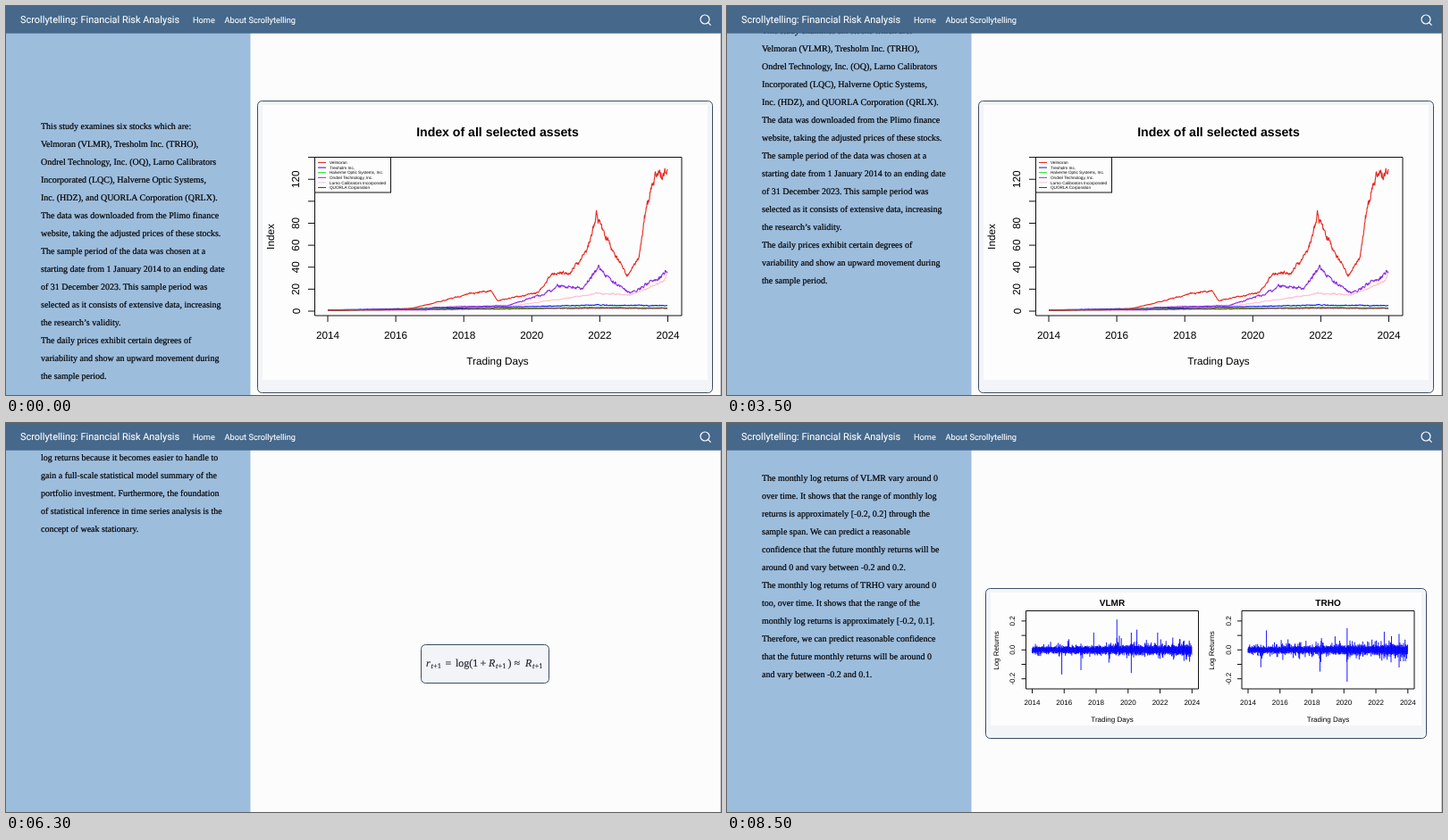
An HTML page that plays this animation: 800x436 px, repeating every 8.6 s.

```html
<!DOCTYPE html>
<html lang="en">
<head>
<meta charset="utf-8">
<title>Scrollytelling: Financial Risk Analysis</title>
<style>
  html, body { margin: 0; width: 100%; height: 100%; overflow: hidden; background: #fcfcfd; }
  svg { display: block; width: 800px; height: 436px; text-rendering: geometricPrecision; }
  .prose { font: 10px "Liberation Serif", Times, serif; stroke: #000; stroke-width: .2; }
  .nav { font: 9.25px Roboto, sans-serif; fill: #fff; stroke: #fff; stroke-width: .1; }
  .brand { font-size: 10.95px; }
  .plot { font: 11.75px "Liberation Sans", Arial, sans-serif; }
  .small { font-size: 8px; }
  .title { font-weight: bold; font-size: 14.1px; }
  .small .title { font-size: 10px; }
  .legend { font-size: 4.67px; }
  .math { font: 12px "Liberation Serif", Times, serif; fill: #1c2430; stroke: #1c2430; stroke-width: .15; }
  .math .sub { font-size: 8.5px; }
  .it { font-style: italic; }
  .card { fill: #f2f4f7; stroke: #3d4c60; }
  .axis { fill: none; stroke: #111; }
</style>
</head>
<body>
<svg viewBox="0 0 800 436">
  <rect width="800" height="436" fill="#fcfcfd"/>
  <rect y="30" width="273.5" height="406" fill="#9dbddd"/>
  <g id="prose" class="prose"></g>

  <g id="index" class="plot">
    <rect class="card" x="281.5" y="106.5" width="509" height="327" rx="5"/>
    <rect x="287" y="111" width="498" height="308" fill="#fdfdfe"/>
  </g>

  <rect id="mathCard" class="card" x="464.5" y="248.5" width="143" height="43" rx="5"/>
  <g id="math" class="math">
    <text class="it" x="470" y="273">r</text><text class="sub" x="475.5" y="275"><tspan class="it">t</tspan>+1</text>
    <text x="491.5" y="273">=</text><text x="503" y="273">log(1</text><text x="530.5" y="273">+</text>
    <text class="it" x="540" y="273">R</text><text class="sub" x="548" y="275"><tspan class="it">t</tspan>+1</text>
    <text x="561.5" y="273">)</text><text x="568.5" y="273">≈</text>
    <text class="it" x="581" y="273">R</text><text class="sub" x="589" y="275"><tspan class="it">t</tspan>+1</text>
  </g>

  <g id="returns" class="plot small">
    <rect class="card" x="289.5" y="185.5" width="493" height="168" rx="5"/>
    <rect x="295" y="190" width="482" height="149" fill="#fdfdfe"/>
  </g>

  <rect x="799" y="31" width="1" height="405" fill="#c4c6ca"/>
  <rect width="800" height="30.7" fill="#45688b"/>
  <g class="nav">
    <text class="brand" x="16" y="19.3">Scrollytelling: Financial Risk Analysis</text>
    <text x="209" y="19">Home</text>
    <text x="244.5" y="19">About Scrollytelling</text>
  </g>
  <path d="M787 15a5 5 0 1 1-10 0a5 5 0 1 1 10 0M785.6 18.6l3 3" fill="none" stroke="#fff" stroke-width="1.2"/>
</svg>
<script>
const LOOP = 8600, STEP = 100;
const $ = id => document.getElementById(id);
const clamp = u => Math.min(1, Math.max(0, u));

function add(parent, tag, attrs, text) {
  const el = document.createElementNS('http://www.w3.org/2000/svg', tag);
  for (const key in attrs) el.setAttribute(key, attrs[key]);
  if (text !== undefined) el.textContent = text;
  return parent.appendChild(el);
}

function label(parent, x, y, text, attrs) {
  return add(parent, 'text', { x, y, 'text-anchor': 'middle', ...attrs }, text);
}

// Rotated label whose baseline sits on x, centred on y
const sideLabel = (parent, x, y, text) =>
  label(parent, x, y, text, { transform: `rotate(-90 ${x} ${y})` });

function seeded(seed) {
  return () => (seed = (seed * 16807) % 2147483647) / 2147483647;
}

// Piecewise linear value through [x, y] points
function lerp(pts, x) {
  const i = Math.max(1, pts.findIndex(p => p[0] >= x));
  const [x0, y0] = pts[i - 1], [x1, y1] = pts[i];
  return y0 + (y1 - y0) * clamp((x - x0) / (x1 - x0));
}

// Running text
const sections = [
  [0, `This study examines six stocks which are:
Velmoran (VLMR), Tresholm Inc. (TRHO),
Ondrel Technology, Inc. (OQ), Larno Calibrators
Incorporated (LQC), Halverne Optic Systems,
Inc. (HDZ), and QUORLA Corporation (QRLX).
The data was downloaded from the Plimo finance
website, taking the adjusted prices of these stocks.
The sample period of the data was chosen at a
starting date from 1 January 2014 to an ending date
of 31 December 2023. This sample period was
selected as it consists of extensive data, increasing
the research’s validity.
The daily prices exhibit certain degrees of
variability and show an upward movement during
the sample period.`],
  [710, `The daily adjusted prices were converted to daily
log returns because it becomes easier to handle to
gain a full-scale statistical model summary of the
portfolio investment. Furthermore, the foundation
of statistical inference in time series analysis is the
concept of weak stationary.`],
  [1240, `The monthly log returns of VLMR vary around 0
over time. It shows that the range of monthly log
returns is approximately [-0.2, 0.2] through the
sample span. We can predict a reasonable
confidence that the future monthly returns will be
around 0 and vary between -0.2 and 0.2.
The monthly log returns of TRHO vary around 0
too, over time. It shows that the range of the
monthly log returns is approximately [-0.2, 0.1].
Therefore, we can predict reasonable confidence
that the future monthly returns will be around 0
and vary between -0.2 and 0.1.`]
];
for (const [top, text] of sections)
  text.split('\n').forEach((line, i) =>
    add($('prose'), 'text', { x: 39, y: 138.2 + top + i * 20 }, line));

// Index chart: name, colour, roughness and turning points as [year, value]
const index = $('index');
const series = [
  ['Velmoran', '#e8261c', .03, [[2014, 1], [2016.3, 1.5], [2017, 6.5], [2018.2, 16], [2018.8, 18.5],
    [2019, 9.5], [2020.2, 17], [2020.6, 35], [2021.1, 34], [2021.6, 53], [2021.9, 88], [2022.2, 66],
    [2022.8, 32], [2023.15, 49], [2023.4, 100], [2023.65, 122], [2024, 131]]],
  ['Tresholm Inc.', '#1414f0', .04, [[2014, 1], [2019, 3.5], [2021.9, 5.5], [2024, 5]]],
  ['Halverne Optic Systems, Inc.', '#18e018', .05, [[2014, .6], [2021.9, 3.5], [2024, 3]]],
  ['Ondrel Technology, Inc.', '#8a2be2', .045, [[2014, 1], [2016.9, 1], [2017.1, 3.5], [2019.3, 5],
    [2020.3, 15], [2020.8, 23], [2021.5, 20], [2021.95, 39], [2022.9, 16], [2023.5, 27], [2024, 36]]],
  ['Larno Calibrators Incorporated', '#ffc0cb', .03, [[2014, 1], [2019.5, 5], [2021.9, 16],
    [2022.9, 15], [2023.9, 27], [2024, 36]]],
  ['QUORLA Corporation', '#7a2a2a', .05, [[2014, .8], [2021.9, 2.7], [2024, 2.4]]]
];
const yearX = year => 360 + (year - 2014) * 38.05;
const valueY = value => 342 - value * 1.2315;

function priceLine([, stroke, rough, pts], seed) {
  const rand = seeded(seed * 7919 + 11);
  let d = '', drift = 0;
  for (let year = 2014; year <= 2024; year += 1 / 80) {
    drift = drift * .8 + (rand() - .5) * 1.6;
    const jitter = drift + (rand() - .5) * 1.4;
    const y = valueY(lerp(pts, year) * (1 + jitter * rough));
    d += `${d ? 'L' : 'M'}${yearX(year).toFixed(1)} ${y.toFixed(1)}`;
  }
  add(index, 'path', { d, fill: 'none', stroke, 'stroke-width': 1.1, 'stroke-linejoin': 'round' });
}

label(index, 550, 146, 'Index of all selected assets', { class: 'title' });
label(index, 550, 401.5, 'Trading Days');
sideLabel(index, 300, 258.5, 'Index');
[4, 1, 2, 5, 3, 0].forEach(i => priceLine(series[i], i + 1));

let ticks = 'M345.5 169.5H756V347H345.5Z';
for (let year = 2014; year <= 2024; year += 2) {
  ticks += `M${yearX(year)} 347v7`;
  label(index, yearX(year), 373, year);
}
for (let value = 0; value <= 140; value += 20) {
  const y = valueY(value);
  ticks += `M345.5 ${y}h-7.5`;
  if (value < 100 || value === 120) sideLabel(index, 328.5, y, value);
}
add(index, 'path', { class: 'axis', d: ticks });

add(index, 'rect', { x: 345.5, y: 169.5, width: 85, height: 39.5, fill: '#fdfdfe', stroke: '#111' });
series.forEach(([name, stroke], i) => {
  const y = 175.5 + i * 5.6;
  add(index, 'path', { d: `M349 ${y}h9`, stroke });
  add(index, 'text', { x: 362, y: y + 1.7, class: 'legend' }, name);
});

// Log return panels: heavy-tailed noise plus the largest spikes as [year, return]
function returnPanel(left, name, seed, spikes) {
  const g = $('returns'), rand = seeded(seed), mid = 254.3;
  const toX = year => left + 7 + (year - 2014) * 17.88;
  const toY = value => mid - value * 162;
  const reach = () => .012 + .018 * rand() + .04 * rand() ** 8 + .07 * rand() ** 50;
  let d = '';
  for (let year = 2014; year <= 2024; year += 1 / 40) {
    const swell = .75 + .05 * (year - 2014);
    d += `M${toX(year).toFixed(1)} ${toY(reach() * swell).toFixed(1)}V${toY(-reach() * swell).toFixed(1)}`;
  }
  for (const [year, value] of spikes) d += `M${toX(year)} ${mid}V${toY(value)}`;
  add(g, 'path', { d, stroke: '#0000ff', 'stroke-width': .9 });

  let axis = `M${left} 210.5h193v87.5h-193Z`;
  for (let year = 2014; year <= 2024; year += 2) {
    axis += `M${toX(year)} 298v5`;
    label(g, toX(year), 316, year);
  }
  for (let i = -2; i <= 2; i++) {
    const y = toY(i / 10);
    axis += `M${left} ${y}h-5`;
    if (i % 2 === 0) sideLabel(g, left - 12, y, (i / 10).toFixed(1));
  }
  add(g, 'path', { class: 'axis', d: axis });
  label(g, left + 96.5, 205, name, { class: 'title' });
  label(g, left + 96.5, 335, 'Trading Days');
  sideLabel(g, left - 31, 255, 'Log Returns');
}
returnPanel(334.5, 'VLMR', 71, [[2015.85, -.17], [2017.05, -.14], [2017.85, .12], [2019.3, .21],
  [2020.2, -.16], [2020.2, .12], [2020.55, .14], [2021.85, .12]]);
returnPanel(576, 'TRHO', 313, [[2014.8, -.12], [2015.15, .135], [2018.5, -.15], [2020.2, .15],
  [2020.2, -.22], [2023.45, .11]]);

// Time run since `from`, with the speed easing up over `len`
function ramp(t, from, len) {
  const u = t - from;
  return u < len ? Math.max(0, u) ** 2 / (2 * len) : u - len / 2;
}

// A short nudge, then one long glide that slows down at the end
function scrollAt(t) {
  return 7.3 * clamp((t - 300) / 400) + .2567 * (ramp(t, 2721, 779) - ramp(t, 7893, 607));
}

function show(id, on) {
  $(id).style.display = on ? '' : 'none';
}

function render(now) {
  const t = Math.floor((now % LOOP) / STEP) * STEP;
  $('prose').setAttribute('transform', `translate(0 ${-scrollAt(t).toFixed(2)})`);
  show('index', t < 4800);
  show('math', t >= 4700 && t < 6800);
  show('mathCard', t >= 4800 && t < 6800);
  show('returns', t >= 6800);
}

const start = performance.now();
function tick() {
  render(performance.now() - start);
  requestAnimationFrame(tick);
}
tick();
</script>
</body>
</html>
```
